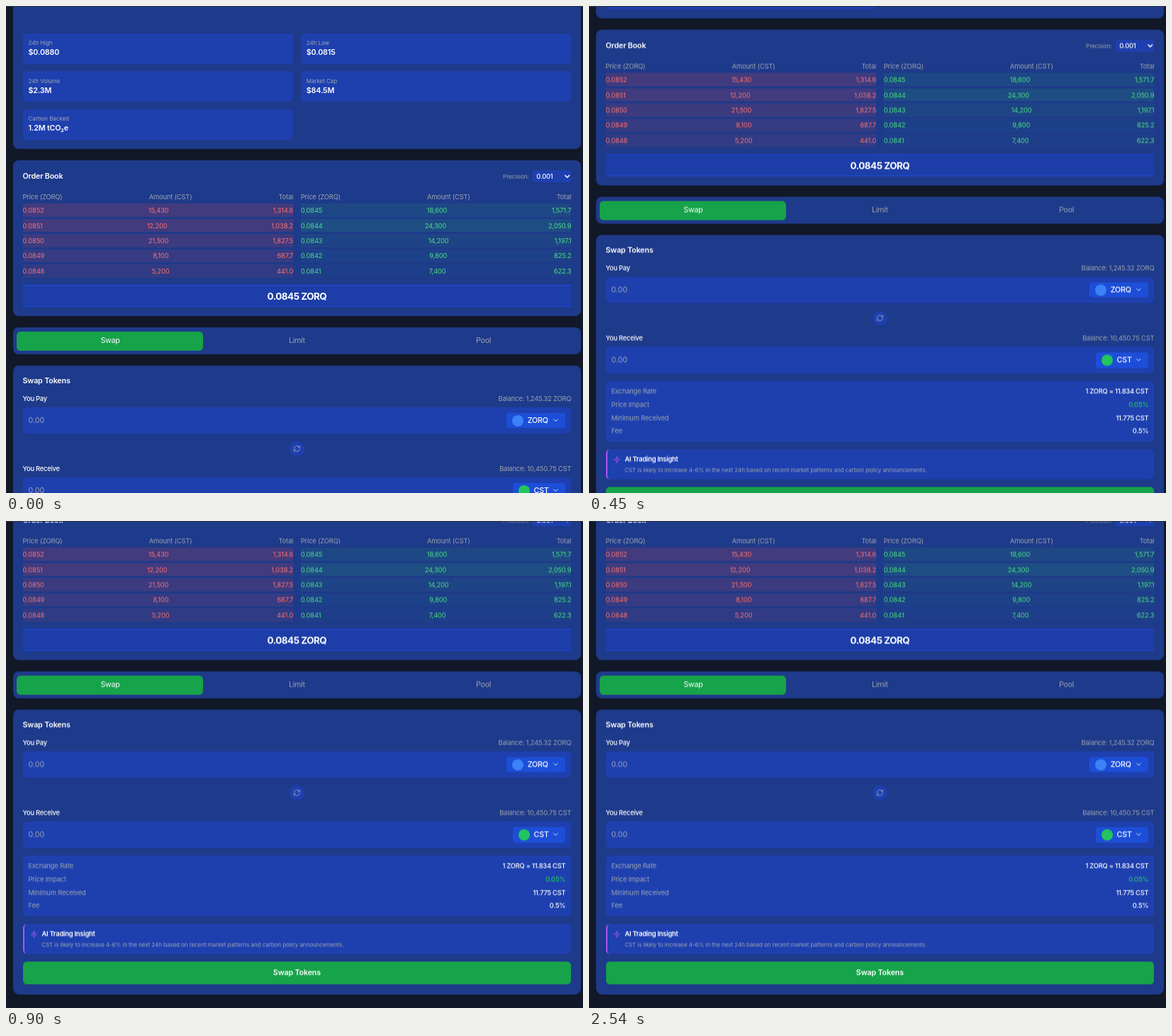
An HTML page that plays this animation: 814 by 688 pixels, repeating every 2840 ms.

```html
<!DOCTYPE html>
<html lang="en">
<head>
<meta charset="utf-8">
<title>Token swap</title>
<style>
  html, body { margin: 0; width: 100%; height: 100%; overflow: hidden; background: #111827; }
  #stage { position: relative; width: 814px; height: 688px; overflow: hidden; font-family: Inter, "Liberation Sans", sans-serif; color: #fff; }
  #page { position: absolute; inset: 0; will-change: transform; }
  #page > *, #cursor { position: absolute; }
  #edge { position: absolute; top: 0; left: 0; width: 100%; height: 1px; background: #2d333d; }
  .box { box-sizing: border-box; }
  .text { height: 20px; line-height: 20px; white-space: pre; }
  .small { font-size: 8.04px; letter-spacing: -.01em; }
  .body { font-size: 9.38px; letter-spacing: -.018em; }
  .medium { font-size: 9.38px; font-weight: 500; letter-spacing: -.026em; }
  .title { font-size: 9.38px; font-weight: 600; letter-spacing: -.026em; }
  .head { font-size: 10.72px; font-weight: 600; letter-spacing: -.015em; }
  .tab { font-size: 10.72px; letter-spacing: -.03em; }
  .token { font-size: 10.72px; font-weight: 500; letter-spacing: -.015em; }
  .input { font-size: 10.72px; }
  .price { font-size: 13.4px; font-weight: 700; letter-spacing: -.035em; }
  .row { display: flex; justify-content: space-between; align-items: center; width: 381.7px; height: 18.76px; }
  svg { display: block; overflow: visible; fill: none; stroke-linecap: round; stroke-linejoin: round; }
</style>
</head>
<body>
<div id="stage">
  <div id="page"></div>
  <svg id="cursor" width="8" height="13">
    <path d="M.6 .9V9.9L2.6 8.1L4.1 11.5L5.6 10.8L4.1 7.5H7.1Z" fill="#000" stroke="#fff" stroke-width=".9"/>
  </svg>
  <div id="edge"></div>
</div>
<script>
const page = document.getElementById('page');
const cursor = document.getElementById('cursor');

const NAVY = '#1e3a8a', BLUE = '#1e40af', BRIGHT = '#1d4ed8', GREEN = '#16a34a';
const GRAY = '#9ca3af', WHITE = '#fff', RED_TEXT = '#f87171', GREEN_TEXT = '#4ade80';
const LEFT = 23.5, RIGHT = 797.4, MID = 410.4, WIDTH = RIGHT - LEFT;
const STABLE = 'ZORQ', COIN = 'CST';

function add(className, style, content = '') {
  const el = document.createElement('div');
  el.className = className;
  Object.assign(el.style, style);
  el.innerHTML = content;
  page.append(el);
  return el;
}

function box(x, y, w, h, background, radius = 5.4, extra = {}) {
  return add('box', {
    left: x + 'px', top: y + 'px', width: w + 'px', height: h + 'px',
    background, borderRadius: radius + 'px', ...extra
  });
}

// y is the middle of the line; align is 0 (left), 0.5 (centre) or 1 (right).
function text(kind, x, y, content, color = WHITE, align = 0) {
  add('text ' + kind, {
    left: x + 'px', top: y - 10 + 'px', color,
    transform: align ? `translateX(${-100 * align}%)` : ''
  }, content);
}

function icon(x, y, size, path, color, weight = 2) {
  add('', { left: x - size / 2 + 'px', top: y - size / 2 + 'px' },
    `<svg width="${size}" height="${size}" viewBox="0 0 24 24" stroke="${color}" stroke-width="${weight}"><path d="${path}"/></svg>`);
}

const CHEVRON = 'M6 9l6 6 6-6';
const REFRESH = 'M3 12a9 9 0 0 1 9-9 9.75 9.75 0 0 1 6.74 2.74L21 8M21 3v5h-5M21 12a9 9 0 0 1-9 9 9.75 9.75 0 0 1-6.74-2.74L3 16M8 16H3v5';
const BOLT = 'M13.5 2L3 13.5H12L10.5 22L21 10.5H12Z';

const card = (top, bottom) => box(10, top, 800.8, bottom - top, NAVY, 8);

function row(x, y, cells, color, background = 'none') {
  add('row body', { left: x + 'px', top: y - 9.38 + 'px', color, background },
    cells.map(c => `<span>${c}</span>`).join(''));
}

function stats() {
  card(-60, 202.2);
  [['24h High', '$0.0880'], ['24h Low', '$0.0815'], ['24h Volume', '$2.3M'],
   ['Market Cap', '$84.5M'], ['Carbon Backed', '1.2M tCO₂e']].forEach(([label, value], i) => {
    const x = i % 2 ? 415.8 : LEFT, y = 38.8 + 53.6 * (i >> 1);
    box(x, y, 381.7, 42.9, BLUE);
    text('small', x + 8, y + 13.3, label, GRAY);
    text('head', x + 8, y + 27.2, value);
  });
}

function orderBook() {
  card(218.3, 438.2);
  text('head', LEFT, 241, 'Order Book');
  text('small', 737.6, 240.8, 'Precision:', GRAY, 1);
  box(743, 232.2, 54.4, 17.2, BLUE, 2.7);
  text('medium', 748.3, 241, '0.001');
  icon(791.8, 240.8, 11.5, CHEVRON, WHITE, 3.2);

  const sides = [
    { x: LEFT, color: RED_TEXT, tint: '239,68,68', alpha: [.17, .17, .14, .12, .09], top: 852,
      amounts: [15430, 12200, 21500, 8100, 5200] },
    { x: 415.8, color: GREEN_TEXT, tint: '34,197,94', alpha: [.1, .13, .07, .05, .03], top: 845,
      amounts: [18600, 24300, 14200, 9800, 7400] }
  ];
  const comma = (n, digits) => n.toLocaleString('en-US', { minimumFractionDigits: digits, maximumFractionDigits: digits });
  for (const s of sides) {
    row(s.x, 270, [`Price (${STABLE})`, `Amount (${COIN})`, 'Total'], GRAY);
    s.amounts.forEach((amount, i) => {
      const price = (s.top - i) / 1e4;
      row(s.x, 288.6 + 21.44 * i, [price.toFixed(4), comma(amount, 0), comma(amount * price, 1)],
        s.color, `rgba(${s.tint},${s.alpha[i]})`);
    });
  }

  const line = '.8px solid ' + BRIGHT;
  box(LEFT, 394, WIDTH, 31, '#1d3ea8', 0, { borderTop: line, borderBottom: line });
  text('price', MID, 409.6, '0.0845 ' + STABLE, WHITE, .5);
}

function tabs() {
  card(454.4, 491.8);
  box(15.3, 459.8, 263.2, 26.8, GREEN);
  ['Swap', 'Limit', 'Pool'].forEach((name, i) =>
    text('tab', 147 + 263.3 * i, 473.3, name, i ? GRAY : WHITE, .5));
}

function field(y, label, balance, token, color, left) {
  text('medium', LEFT, y - 31, label);
  text('body', RIGHT, y - 31, `Balance: ${balance} ${token}`, GRAY, 1);
  box(LEFT, y - 18.7, WIDTH, 37.4, BLUE);
  text('input', 31.4, y, '0.00', GRAY);
  box(left, y - 10.8, 789.4 - left, 21.6, BRIGHT, 4);
  box(left + 8, y - 8, 16.1, 16.1, color, 8.1);
  text('token', left + 29.5, y, token);
  icon(775.8, y, 10.7, CHEVRON, WHITE);
}

function swap() {
  card(507.9, 909.6);
  text('head', LEFT, 529.6, 'Swap Tokens');
  field(585.7, 'You Pay', '1,245.32', STABLE, '#3b82f6', 706.2);
  box(MID - 10.7, 615, 21.4, 21.4, BLUE, 10.7);
  icon(MID, 625.8, 10.7, REFRESH, GRAY);
  field(684.8, 'You Receive', '10,450.75', COIN, '#22c55e', 715);

  box(LEFT, 714, WIDTH, 85.6, BLUE);
  [['Exchange Rate', `1 ${STABLE} = 11.834 ${COIN}`], ['Price Impact', '0.05%', '#22c55e'],
   ['Minimum Received', `11.775 ${COIN}`], ['Fee', '0.5%']].forEach(([label, value, color], i) => {
    const y = 729 + 18.76 * i;
    text('body', 31.4, y, label, GRAY);
    text('medium', 789.4, y, value, color, 1);
  });

  box(LEFT, 810.6, WIDTH, 42.6, BLUE, 5.4, { borderLeft: '2.7px solid #a855f7' });
  icon(39.4, 825.2, 10.7, BOLT, '#a855f7');
  text('title', 50.4, 825.1, 'AI Trading Insight');
  text('small', 50.2, 839.7, `${COIN} is likely to increase 4-6% in the next 24h based on recent market patterns and carbon policy announcements.`, GRAY);

  box(LEFT, 864, WIDTH, 32.2, GREEN);
  text('head', MID, 880.2, 'Swap Tokens', WHITE, .5);
}

stats();
orderBook();
tabs();
swap();

const LOOP = 2840;
// [start ms, scroll offset]
const scrollSteps = [[0, 0], [150, 4], [300, 103], [450, 184.5], [600, 186.5], [750, 220], [900, 241.5]];
// [start ms, x, y]; no position means hidden
const cursorSteps = [[0], [2100, 803.6, 640], [2250, 803.8, 640.8], [2390, 805.6, 686], [2540]];

const stepAt = (steps, t) => steps.filter(s => s[0] <= t).pop();

function draw() {
  const t = performance.now() % LOOP;
  page.style.transform = `translateY(${-stepAt(scrollSteps, t)[1]}px)`;
  const [, x, y] = stepAt(cursorSteps, t);
  cursor.style.visibility = x === undefined ? 'hidden' : 'visible';
  if (x !== undefined) cursor.style.transform = `translate(${x}px, ${y}px)`;
  requestAnimationFrame(draw);
}
cursor.style.left = cursor.style.top = 0;
draw();
</script>
</body>
</html>
```
